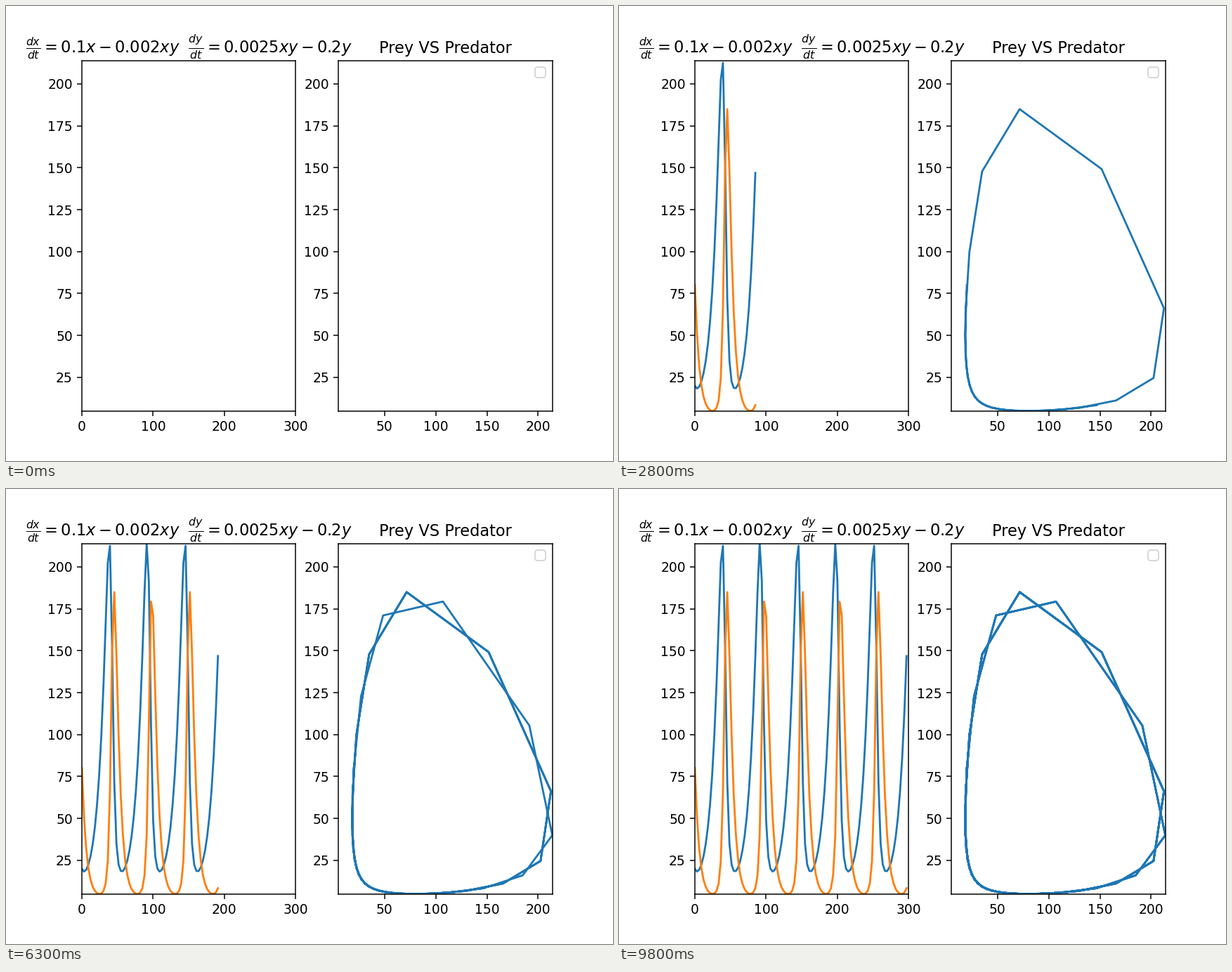
These frames come from a looping animation (864x648 px, 9.9 s). A matplotlib script:

```python
import numpy as np
import matplotlib.pyplot as plt
from matplotlib.animation import FuncAnimation

POINTS, T_END = 100, 300
STEP = T_END / POINTS
START = (20.0, 80.0)
SUBSTEPS = 200


def rates(state):
    x, y = state
    return np.array([0.1 * x - 0.002 * x * y, 0.0025 * x * y - 0.2 * y])


def rk4_step(state, h):
    k1 = rates(state)
    k2 = rates(state + h / 2 * k1)
    k3 = rates(state + h / 2 * k2)
    k4 = rates(state + h * k3)
    return state + h / 6 * (k1 + 2 * k2 + 2 * k3 + k4)


def solve(points, step):
    state = np.array(START)
    path = [state]
    for _ in range(points - 1):
        for _ in range(SUBSTEPS):
            state = rk4_step(state, step / SUBSTEPS)
        path.append(state)
    return np.array(path)


# The time axis spreads the samples over the full range.
t = np.linspace(0, T_END, POINTS)
path = solve(POINTS, STEP)
prey, predator = path.T
limits = path.min(), path.max()

fig, (ax_time, ax_phase) = plt.subplots(1, 2, figsize=(6.4, 4.8), dpi=135)

ax_time.set_title(r"$\frac{dx}{dt}=0.1x-0.002xy$  $\frac{dy}{dt}=0.0025xy-0.2y$")
ax_time.set(xlim=(0, T_END), ylim=limits)
ax_phase.set_title("Prey VS Predator")
ax_phase.set(xlim=limits, ylim=limits)
ax_phase.legend(handles=[], loc="upper right")

prey_line, = ax_time.plot([], [], color="C0")
predator_line, = ax_time.plot([], [], color="C1")
phase_line, = ax_phase.plot([], [], color="C0")


def update(i):
    n = i + 1
    prey_line.set_data(t[:n], prey[:n])
    predator_line.set_data(t[:n], predator[:n])
    phase_line.set_data(prey[:n], predator[:n])
    return prey_line, predator_line, phase_line


anim = FuncAnimation(fig, update, frames=POINTS - 1, interval=100,
                     repeat=True, repeat_delay=0)
plt.show()
```
